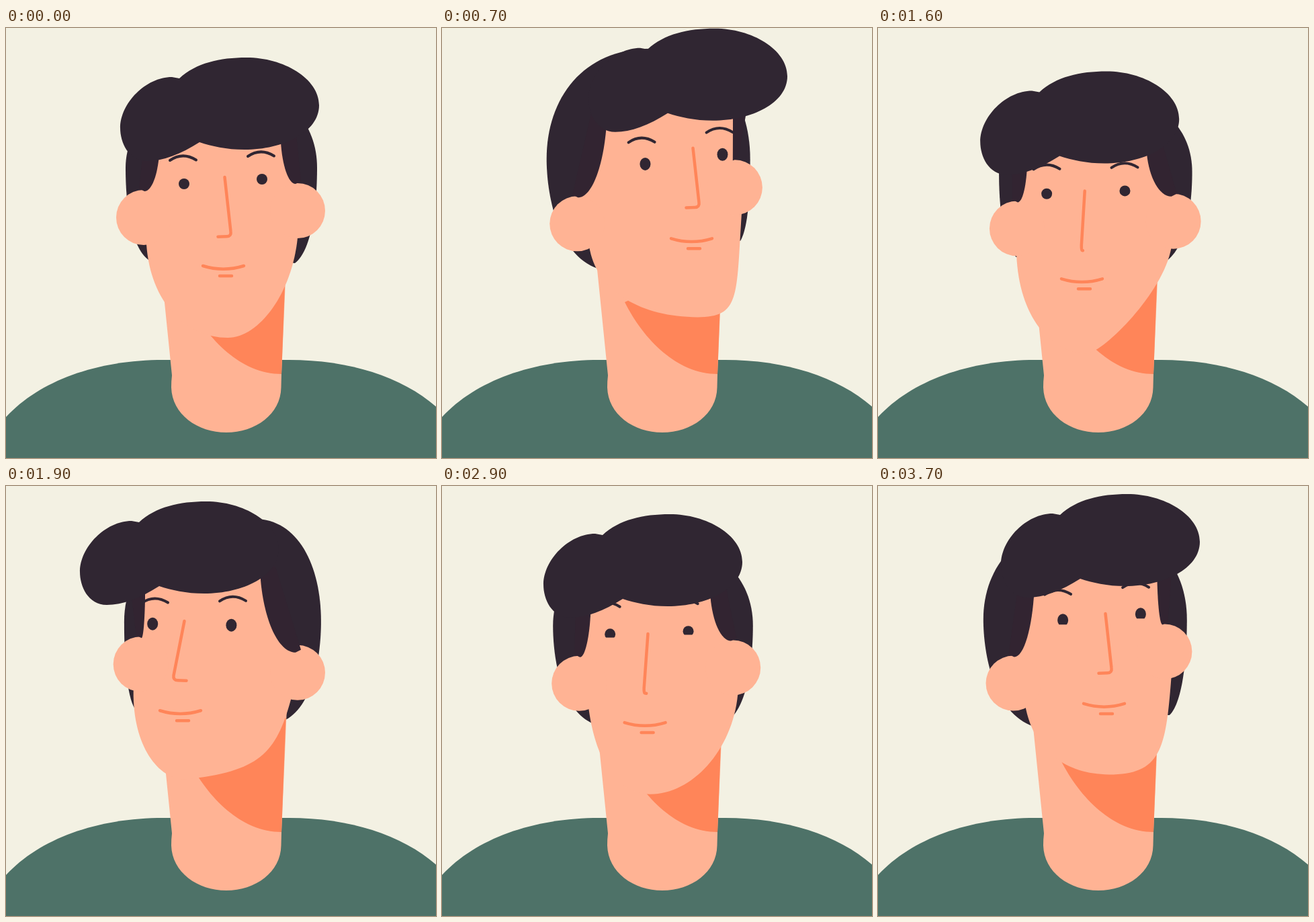
An HTML page with a canvas that plays this animation: 640x640 px, repeating every 3.8 s.

```html
<!DOCTYPE html>
<html lang="en">
<head>
<meta charset="utf-8">
<title>Looking around</title>
<style>
html, body { margin: 0; height: 100%; overflow: hidden; background: #f3f1e3; }
canvas { display: block; width: 100vw; height: 100vh; }
</style>
</head>
<body>
<canvas id="stage" width="640" height="640"></canvas>
<script>
const ctx = document.getElementById('stage').getContext('2d');
const LOOP = 3800, STEP = 100;
const BG = '#f3f1e3', SHIRT = '#4e7268', SKIN = '#ffb394', SHADE = '#ff8559',
  HAIR = '#302632', SIDE = '#322431';

// time, fringe corner x and y, turn of the skull, blink
const keys = [
  [0, 288, 170, 0, 0], [200, 320, 194, 0.6, 0], [400, 351, 172, 1, 0],
  [600, 336, 131, 1, 0], [800, 336, 125, 1, 0], [1200, 336, 130, 1, 0],
  [1500, 288, 198, 0, 0], [1900, 228, 149, -1, 0], [2500, 223, 146, -1, 0],
  [2900, 269, 168, 0.7, 1], [3000, 300, 144, 1, 0.5], [3200, 301, 133, 1, 0],
  [3600, 301, 137, 1, 0], [3700, 301, 138, 1, 1]
];

const clamp = (v, lo, hi) => Math.min(hi, Math.max(lo, v));

function key(i) {
  const n = keys.length, lap = Math.floor(i / n);
  const [t, ...v] = keys[i - lap * n];
  return { t: t + lap * LOOP, v };
}

// smooth curve through the keys that never overshoots them
function sample(t) {
  const i = keys.findLastIndex(k => k[0] <= t);
  const [p, a, b, n] = [-1, 0, 1, 2].map(d => key(i + d));
  const span = b.t - a.t, u = (t - a.t) / span, w = 1 - u;
  const slope = (k, l, j) => (l.v[j] - k.v[j]) / (l.t - k.t);
  const blend = (r, s) => r * s > 0 ? 2 * r * s / (r + s) : 0;
  return a.v.map((from, j) => {
    const s = slope(a, b, j);
    const m1 = blend(slope(p, a, j), s), m2 = blend(s, slope(b, n, j));
    return from * (1 + 2 * u) * w * w + b.v[j] * u * u * (3 - 2 * u) +
      span * u * w * (m1 * w - m2 * u);
  });
}

function fill(color, d) {
  ctx.fillStyle = color;
  ctx.fill(new Path2D(d));
}

function line(width, color, d) {
  ctx.lineWidth = width;
  ctx.strokeStyle = color;
  ctx.stroke(new Path2D(d));
}

function oval(color, x, y, rx, ry = rx) {
  ctx.fillStyle = color;
  ctx.beginPath();
  ctx.ellipse(x, y, rx, ry, 0, 0, 7);
  ctx.fill();
}

// all parts of the head follow from how far the fringe moved and the turn
function build([x, y, turn, blink]) {
  const u = x - 288, v = y - 170;
  const right = Math.max(0, u), nearL = Math.max(0, turn), nearR = Math.max(0, -turn);
  const earL = [205 + 0.03 * u + 0.12 * v, 282 + 18 * nearL + v * (0.8 - 0.6 * nearL)];
  const earR = [434 + 0.4 * right + 0.4 * v * (1 - nearR),
    272 + 10 * nearR + v * (0.8 - 0.6 * nearR)];
  return {
    x, y, u, v, turn, blink, nearR, earL, earR,
    chin: [330 + 1.05 * u, 461 + 1.15 * v + 0.4 * right],
    burnL: [x - 60 - 0.65 * u, y + 18, earL[0] + 1, earL[1] - 39],
    burnR: [x + 121 - 0.5 * u, y + 0.15 * u, earR[0] - 3, earR[1] - 40 + 10 * nearR],
    top: [340 - 30 * turn, y - 80 - Math.abs(u) / 3],
    backL: [178 - 18 * nearL + 0.1 * v, 208 + 0.3 * v, 212 + 20 * turn, 345 + 13 * turn],
    backR: [463 + 8 * nearR + 0.1 * v, 208 + 0.3 * v, 430 + 0.3 * u, 350 - 0.7 * right]
  };
}

function backHair({ top: [tx, ty], backL, backR }) {
  for (const [x, y, ex, ey] of [backL, backR]) {
    fill(HAIR, `M${tx} ${ty}C${tx + (x - tx) * 0.65} ${ty} ${x} ${y - (y - ty) * 0.55} ` +
      `${x} ${y}C${x} ${y + 50} ${x + (ex - x) * 0.2} ${ey - 20} ${ex} ${ey}L328 340Z`);
  }
}

function body() {
  fill(SKIN, 'M228 330L247 517Q246 525 246 535C247 575 285 602 328 602' +
    'C371 602 409 575 409.5 535L410 515L418 330Z');
  fill(SHADE, 'M272 408C300 464 350 515 410 515L416.5 345Z');
}

function face({ x, y, v, turn, nearR, earL, earR, chin: [cx, cy], burnL, burnR }) {
  const lx = earL[0] + 4 + 15 * turn, ly = earL[1] + 40;
  const rx = earR[0] + 10 * turn, ry = earR[1] + 40;
  fill(SKIN, `M${lx} ${ly}` +
    `C${lx + 6 + 7 * turn} ${ly + (cy - ly) * 0.62} ${cx - (cx - lx) * 0.52} ${cy} ${cx} ${cy}` +
    `C${cx + (rx - cx) * (0.45 - 0.012 * v)} ${cy - 12 * nearR} ` +
    `${rx - 8 - 14 * nearR} ${ry + (cy - ry) * (0.55 - 0.006 * v)} ${rx} ${ry}` +
    `L${burnR[2]} ${burnR[3]}L${burnR[0] + 8} ${burnR[1] - 10}L${x} ${y - 12}` +
    `L${burnL[0] - 8} ${burnL[1] - 10}L${burnL[2]} ${burnL[3]}Z`);
  oval(SKIN, ...earL, 41);
  oval(SKIN, ...earR, 41);
}

function sideburn([x, y, bx, by], side) {
  const dx = bx - x;
  fill(SIDE, `M${x} ${y - 20}L${x} ${y}C${x + dx * 0.1} ${y + (by - y) * 0.55} ` +
    `${bx - dx * 0.5} ${by} ${bx} ${by}L${bx + side * 8} ${by - 4}L${x + side * 22} ${y - 20}Z`);
}

function eye(x, y, ry, blink) {
  const lid = 3 * blink;
  oval(HAIR, x, y, 8, ry);
  ctx.fillStyle = SKIN;
  if (lid) ctx.fillRect(x - 10, y + ry - lid, 20, lid + 1);
}

function features({ x, y, u, v, blink }) {
  const ry = 8 + 1.5 * clamp(-v / 20, 0, 1), ey = y - 0.15 * v - 7 * blink;
  eye(x - 23 - 0.22 * u, ey + 62 + 0.15 * u, ry, blink);
  eye(x + 93 - 0.24 * u, ey + 55, ry, blink);

  const brow = (bx, by) =>
    line(4, HAIR, `M${bx - 5 * blink} ${by - 13 * blink}q19 -13 39 -0.5`);
  brow(x - 44 - 0.3 * u, y + 27 + 0.12 * u - 0.25 * v);
  brow(x + 72 - 0.3 * u, y + 21 + 0.03 * u - 0.15 * v);

  const side = clamp(1 + u / 16, -1, 1);
  const nx = x + 37.5, ny = y + 52, tip = nx - 3.5 + 12.5 * side;
  line(4.5, SHADE, `M${nx} ${ny}L${tip} ${ny + 81}Q${tip + side} ${ny + 88} ` +
    `${tip - 6 * side} ${ny + 88.3}L${tip - 19 * side} ${ny + 88.7}`);
  const mx = x + 3 + 2 * side, my = y + 184 - 0.06 * v;
  line(4.5, SHADE, `M${mx} ${my}q30.5 9.5 61 0M${mx + 25} ${my + 15}h18`);
}

function topHair({ x, y }) {
  ctx.save();
  ctx.translate(x, y);
  fill(HAIR, 'M0 0C-28 18 -55 28 -78 28C-106 28 -118 0 -118 -21' +
    'C-118 -58 -80 -97 -41 -97L-30 -95C-5 -118 30 -126 70 -126' +
    'C125 -126 178 -95 178 -55C178 -15 125 11 67 11C40 11 18 6 0 0Z');
  ctx.restore();
}

function draw(t) {
  const head = build(sample(t));
  ctx.lineCap = ctx.lineJoin = 'round';
  ctx.fillStyle = BG;
  ctx.fillRect(0, 0, 640, 640);
  fill(SHIRT, 'M0 579C50 525 135 494 235 494H421C521 494 606 525 656 579V640H0Z');
  backHair(head);
  body();
  face(head);
  sideburn(head.burnL, -1);
  sideburn(head.burnR, 1);
  features(head);
  topHair(head);
}

const start = performance.now();
function tick() {
  const t = (performance.now() - start) % LOOP;
  draw(Math.floor(t / STEP) * STEP);
  requestAnimationFrame(tick);
}
tick();
</script>
</body>
</html>
```
